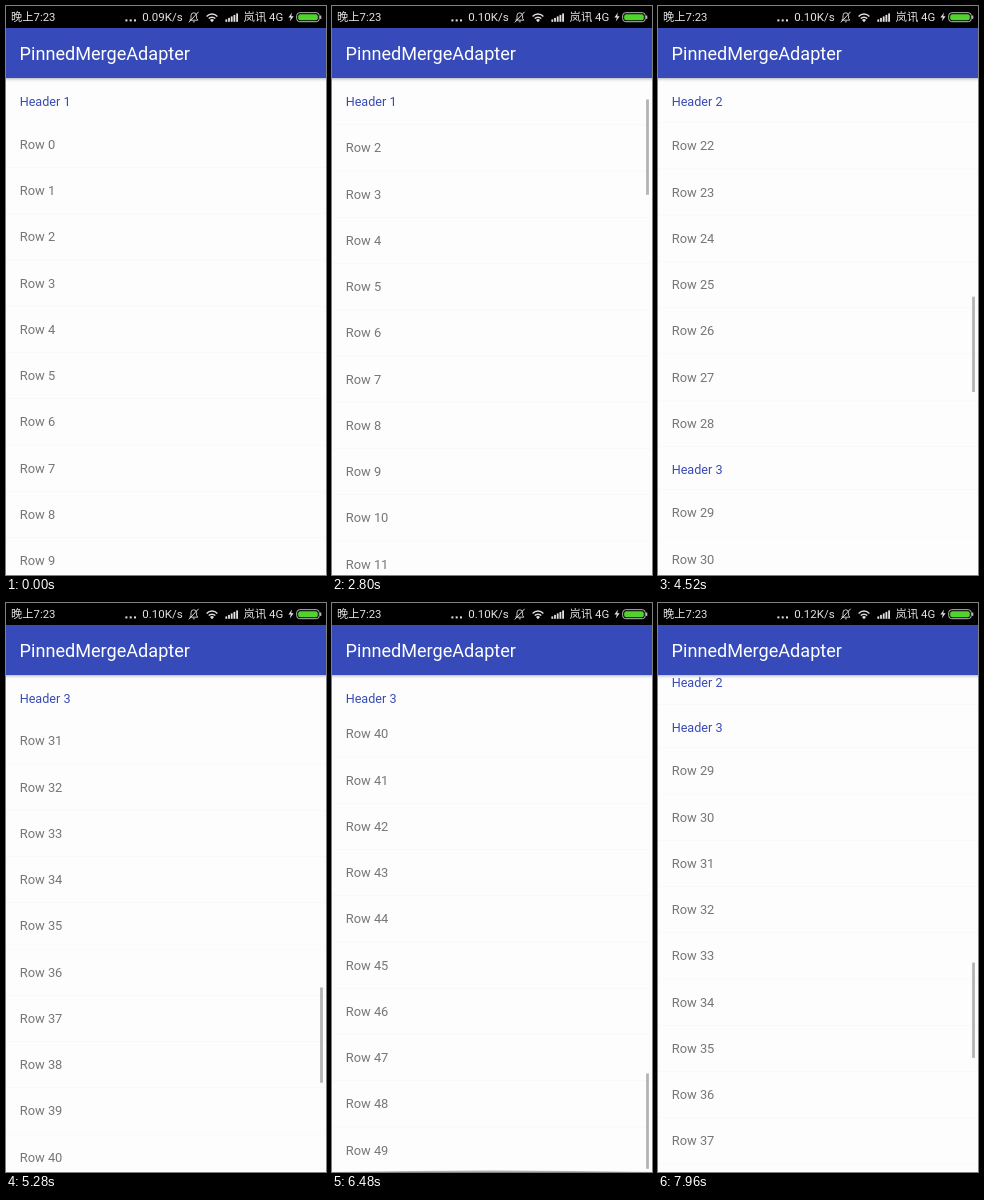
Write an HTML page with a canvas that moves like this. It is 320x569 px and loops after 8 s.

```html
<!DOCTYPE html>
<html lang="zh">
<head>
<meta charset="utf-8">
<style>
html, body { margin: 0; width: 100%; height: 100%; overflow: hidden; background: #fdfdfd; }
canvas { display: block; width: 320px; height: 569px; }
</style>
</head>
<body>
<canvas id="stage"></canvas>
<script>
const W = 320, H = 569, LOOP = 8000, STEP = 40;
const TOP = 72, ROW_H = 46.25, HEAD_H = 43.4, PIN_H = 45.5;
const PAPER = '#fdfdfd', BLUE = '#384bb5', GREY = '#767676';
const SANS = 'Roboto, "Noto Sans CJK SC", "Noto Sans CJK", sans-serif';

const canvas = document.getElementById('stage');
const dpr = window.devicePixelRatio || 1;
canvas.width = W * dpr;
canvas.height = H * dpr;
const ctx = canvas.getContext('2d');

// List model: three sections, rows numbered straight through.
const items = [];
let end = 0;
function add(text, height, head) {
  items.push({ text, y: end, height, head });
  end += height;
}
for (let n = 0; n < 50; n++) {
  const section = [0, 13, 29].indexOf(n);
  if (section >= 0) add('Header ' + (section + 1), HEAD_H, true);
  add('Row ' + n, ROW_H, false);
}
const heads = items.filter(i => i.head);

// Scroll offset over time: [ms, px], joined by a monotone cubic.
const keys = [[2760, 80], [2800, 89], [3520, 514.7], [4520, 1059.5], [5280, 1521],
  [6060, 1944.3], [6520, 1944.3], [7960, 1398.5]];
const slope = keys.slice(1).map((k, i) => (k[1] - keys[i][1]) / (k[0] - keys[i][0]));
const tangent = keys.map((k, i) => {
  const a = slope[i - 1], b = slope[i];
  if (a === undefined) return b;
  if (b === undefined) return a;
  return a * b > 0 ? 2 * a * b / (a + b) : 0;
});

function scrollAt(t) {
  if (t < 1800) return 0;
  if (t <= keys[0][0]) return keys[0][1];
  let i = 0;
  while (i < keys.length - 2 && t > keys[i + 1][0]) i++;
  const [t0, y0] = keys[i], [t1, y1] = keys[i + 1];
  const d = t1 - t0, u = Math.min(1, (t - t0) / d), v = 1 - u;
  return y0 * (1 + 2 * u) * v * v + tangent[i] * d * u * v * v +
    y1 * u * u * (3 - 2 * u) - tangent[i + 1] * d * u * u * v;
}

function rect(x, y, w, h, fill) {
  ctx.fillStyle = fill;
  ctx.fillRect(x, y, w, h);
}

function text(str, x, y, size, fill) {
  ctx.font = `${size}px ${SANS}`;
  ctx.fillStyle = fill;
  ctx.fillText(str, x, y);
}

function stroke(path, width, color = '#ddd') {
  ctx.strokeStyle = color;
  ctx.lineWidth = width;
  ctx.stroke(new Path2D(path));
}

function label(item, y) {
  if (item.head) text(item.text, 13.7, y + 27.5, 12.6, BLUE);
  else text(item.text, 13.7, y + 27.5, 12.9, GREY);
}

function drawList(s) {
  for (const item of items) {
    const y = TOP + item.y - s;
    if (y + item.height < TOP || y > H) continue;
    label(item, y);
    rect(0, y + item.height - 0.4, W, 0.5, 'rgba(0,0,0,.035)');
  }
  let k = heads.length - 1;
  while (heads[k].y > s) k--;
  const next = heads[k + 1];
  const push = next ? Math.min(0, next.y - s - PIN_H) : 0;
  rect(0, TOP + push, W, HEAD_H, PAPER);
  label(heads[k], TOP + push);
}

function drawGlow(t) {
  const u = (t - 6040) / 480;
  if (u < 0 || u > 1) return;
  ctx.fillStyle = 'rgba(0,0,0,.3)';
  ctx.beginPath();
  ctx.moveTo(0, H);
  ctx.quadraticCurveTo(W / 2, H - 36 * (1 - u), W, H);
  ctx.fill();
}

function drawToolbar() {
  const shade = ctx.createLinearGradient(0, TOP, 0, TOP + 4);
  shade.addColorStop(0, 'rgba(0,0,0,.24)');
  shade.addColorStop(0.5, 'rgba(0,0,0,.07)');
  shade.addColorStop(1, 'rgba(0,0,0,0)');
  rect(0, TOP, W, 4, shade);
  rect(0, 22, W, TOP - 22, '#364ab9');
  text('PinnedMergeAdapter', 13.6, 54, 18.1, '#fff');
}

function drawStatus(t) {
  const ink = '#e2e2e2', base = 15;
  rect(0, 0, W, 22, '#000');
  text('晚上7:23', 5, base, 11.3, ink);
  for (let i = 0; i < 3; i++) rect(119.4 + i * 4.3, 13.4, 2, 2, ink);
  const rate = t < 40 ? '0.09' : t < 6800 ? '0.10' : '0.12';
  text(rate + 'K/s', 136.3, base, 11.5, ink);

  // Muted bell
  stroke('M183.8 14.2H191.8L190.6 12.4V9.6A2.8 2.8 0 0 0 185 9.6V12.4ZM186.8 15.8H188.8', 0.9);
  stroke('M192.6 5.8L182.8 16.4', 1);

  // Wi-Fi
  stroke('M200.6 10.4A7.4 7.4 0 0 1 211.4 10.4M202.7 12.6A4.6 4.6 0 0 1 209.3 12.6', 1.4);
  ctx.fillStyle = ink;
  ctx.fill(new Path2D('M204 14A3 3 0 0 1 208 14L206 16.2Z'));

  for (let i = 0; i < 5; i++) rect(219.4 + i * 2.7, 13.4 - i * 1.5, 1.8, 2.4 + i * 1.5, ink);
  text('岚讯 4G', 237.5, base, 11.4, ink);

  ctx.fillStyle = ink;
  ctx.fill(new Path2D('M286 6.6L282.4 11.6H284.8L283.8 15.4L287.6 10.2H285.2Z'));

  // Battery
  ctx.beginPath();
  ctx.roundRect(290.7, 6.7, 22.6, 9, 3);
  ctx.strokeStyle = '#bbb';
  ctx.lineWidth = 1;
  ctx.stroke();
  ctx.beginPath();
  ctx.roundRect(292.2, 8.2, 19.6, 6, 2);
  ctx.fillStyle = '#4fd42c';
  ctx.fill();
  rect(314, 9.5, 1.3, 3.4, '#bbb');
}

function draw(t) {
  const s = scrollAt(t);
  ctx.setTransform(dpr, 0, 0, dpr, 0, 0);
  rect(0, 0, W, H, PAPER);
  drawList(s);
  drawGlow(t);
  if (t >= 1800) rect(314.1, 75.4 + 0.2032 * s, 2.8, 95.3, 'rgba(0,0,0,.29)');
  drawToolbar();
  drawStatus(t);
}

const start = performance.now();
function tick() {
  const t = (performance.now() - start) % LOOP;
  draw(Math.floor(t / STEP) * STEP);
  requestAnimationFrame(tick);
}
tick();
</script>
</body>
</html>
```
